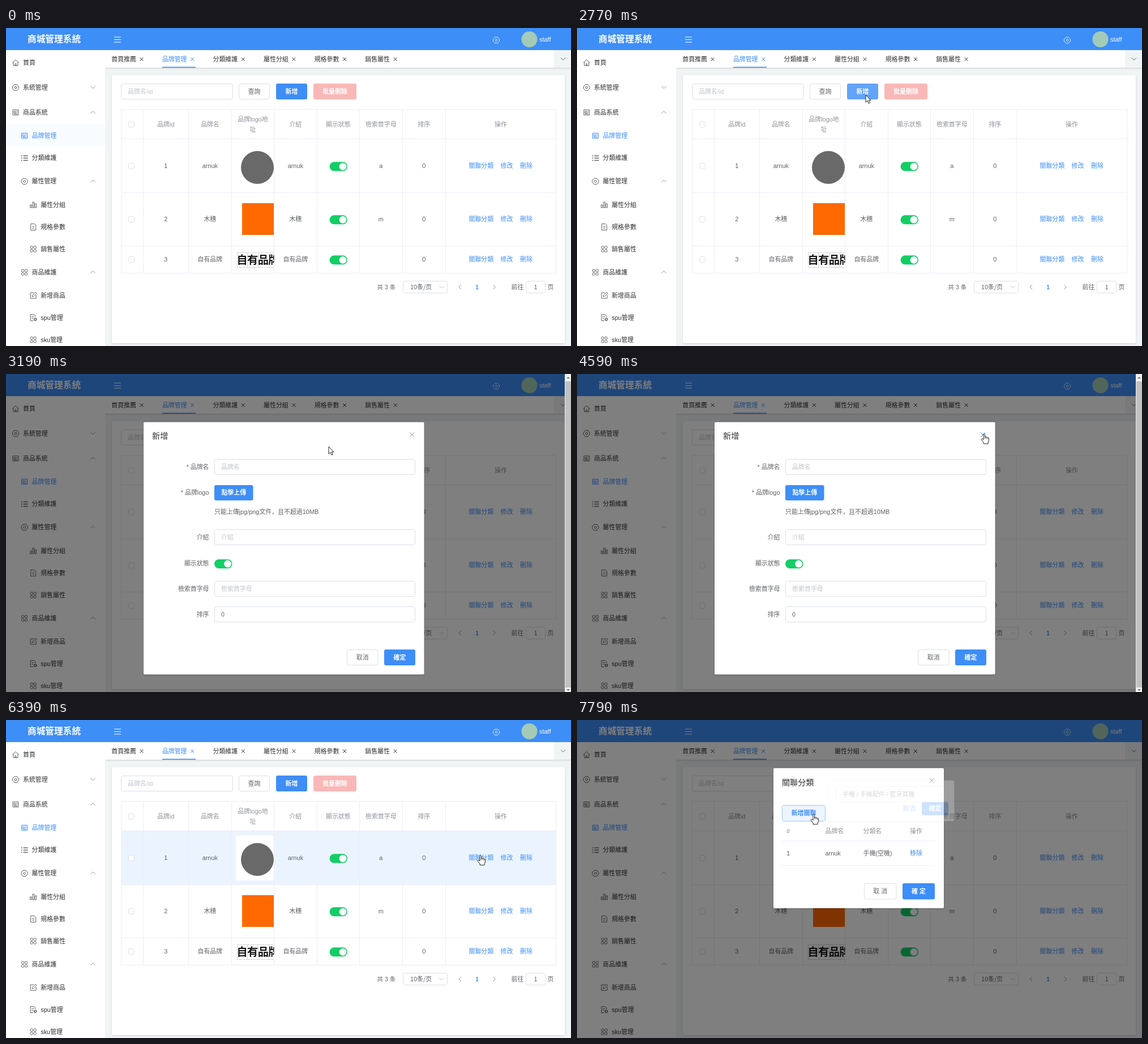
An HTML page for the animation above (8000 ms loop, 998x561 px).

```html
<!DOCTYPE html>
<html lang="zh-CN">
<head>
<meta charset="utf-8">
<title>商城管理系統</title>
<style>
html, body { margin: 0; width: 100%; height: 100%; overflow: hidden; background: #f1f4f5; }
svg { display: block; width: 998px; height: 561px; }
text { font: 10.92px "Liberation Sans", "Noto Sans CJK SC", "Noto Sans CJK TC", "Noto Sans CJK", sans-serif; white-space: pre; }
.medium { font-weight: 500; }
.bold { font-weight: 700; }
.value { font-family: "Noto Sans CJK SC", "Noto Sans CJK TC", "Noto Sans CJK", sans-serif; }
.anim { animation: 8s step-end infinite; }

#menuHover { animation-name: menuHover; }
@keyframes menuHover {
  0% { fill: #f9fcff; }
  22.125% { fill: #e9f3fe; }
  24.625%, 100% { fill: #fff; }
}
#addButton { animation-name: addButton; }
@keyframes addButton {
  0% { fill: #3e8ef7; }
  34.625% { fill: #62a4f9; }
  62.375%, 100% { fill: #3e8ef7; }
}
#rowHover { animation-name: rowHover; }
@keyframes rowHover {
  0% { opacity: 0; }
  67.375% { opacity: 1; }
  84.875%, 100% { opacity: 0; }
}
#shade { animation-name: shade; }
@keyframes shade {
  0% { opacity: 0; }
  37.125% { opacity: .34; }
  39.875% { opacity: .5; }
  59.875% { opacity: .02; }
  62.375% { opacity: 0; }
  82.375% { opacity: .34; }
  84.875%, 100% { opacity: .5; }
}
#scrollbar { animation-name: fadeBrand; }
@keyframes fadeBrand {
  0% { opacity: 0; }
  37.125% { opacity: .55; }
  39.875% { opacity: 1; }
  59.875% { opacity: .22; }
  62.375%, 100% { opacity: 0; }
}
#brandDialog { animation-name: fadeBrand, slideBrand; }
@keyframes slideBrand {
  0%, 37.125% { transform: translateY(-8px); }
  39.875% { transform: none; }
  59.875%, 100% { transform: translateY(-12px); }
}
#brandClose { animation-name: brandClose; }
@keyframes brandClose {
  0% { stroke: #909399; }
  44.875% { stroke: #3e8ef7; }
  59.875%, 100% { stroke: #909399; }
}
#linkDialog { animation-name: linkDialog; }
@keyframes linkDialog {
  0% { opacity: 0; transform: translateY(-8px); }
  82.375% { opacity: .55; transform: translateY(-8px); }
  84.875%, 100% { opacity: 1; transform: none; }
}
#linkHover { animation-name: linkHover; }
@keyframes linkHover { 0% { opacity: 0; } 94.875%, 100% { opacity: 1; } }
#popover { animation-name: popover; }
@keyframes popover { 0% { opacity: 0; } 97.375%, 100% { opacity: .25; } }

#pointer { animation-name: pointer; }
@keyframes pointer {
  0%, 2.5% { transform: translate(917px, 327px); }
  5% { transform: translate(690px, 292px); }
  7.5% { transform: translate(380px, 238px); }
  9.625% { transform: translate(150px, 202px); }
  12.125% { transform: translate(124px, 197px); }
  22.125% { transform: translate(310px, 172px); }
  24.625% { transform: translate(400px, 158px); }
  27.125% { transform: translate(465px, 140px); }
  29.625% { transform: translate(498px, 124px); }
  32.125% { transform: translate(509px, 119px); }
  34.625% { transform: translate(510px, 118px); }
  39.875% { transform: translate(570px, 128px); }
  42.375% { transform: translate(664px, 118px); }
  44.875% { transform: translate(708px, 107px); }
  47.375% { transform: translate(717px, 105px); }
  49.875% { transform: translate(718px, 105px); }
  62.375% { transform: translate(737px, 131px); }
  64.875% { transform: translate(785px, 195px); }
  67.375% { transform: translate(824px, 242px); }
  69.875% { transform: translate(830px, 249px); }
  72.375% { transform: translate(837px, 238px); }
  87.375% { transform: translate(720px, 212px); }
  89.875% { transform: translate(530px, 178px); }
  92.375%, 100% { transform: translate(417px, 166px); }
}
#arrow { animation-name: arrow; }
@keyframes arrow {
  0% { opacity: 0; }
  2.5% { opacity: 1; }
  12.125% { opacity: 0; }
  22.125% { opacity: 1; }
  44.875% { opacity: 0; }
  62.375% { opacity: 1; }
  72.375% { opacity: 0; }
  87.375% { opacity: 1; }
  92.375%, 100% { opacity: 0; }
}
#hand { animation-name: hand; }
@keyframes hand {
  0% { opacity: 0; }
  12.125% { opacity: 1; }
  22.125% { opacity: 0; }
  44.875% { opacity: 1; }
  62.375% { opacity: 0; }
  72.375% { opacity: 1; }
  87.375% { opacity: 0; }
  92.375%, 100% { opacity: 1; }
}
</style>
</head>
<body>
<svg id="stage" viewBox="0 0 998 561"></svg>
<script>
const BLUE = '#3e8ef7', INK = '#303133', TEXT = '#606266', MUTED = '#909399',
  HINT = '#c0c4cc', BORDER = '#dcdfe6', GRID = '#ebeef5', BACK = '#f1f4f5';

const rect = (x, y, w, h, fill, more = '') =>
  `<rect x="${x}" y="${y}" width="${w}" height="${h}" fill="${fill}" ${more}/>`;
const path = (d, color, more = '') => `<path d="${d}" fill="none" stroke="${color}" ${more}/>`;
const circle = (x, y, r, fill, more = '') => `<circle cx="${x}" cy="${y}" r="${r}" fill="${fill}" ${more}/>`;
// y is the vertical middle of the line
const text = (x, y, label, fill = TEXT, more = '', size = 10.92) =>
  `<text x="${x}" y="${y + size * .36}" fill="${fill}" style="font-size:${size}px" ${more}>${label}</text>`;
const MID = 'text-anchor="middle"', END = 'text-anchor="end"',
  MEDIUM = 'class="medium"', BOLD = 'class="bold"', VALUE = 'class="value"';
const group = (id, body) => `<g id="${id}" class="anim">${body}</g>`;

const box = (x, y, w, h, stroke = BORDER, more = '') =>
  rect(x + .5, y + .5, w - 1, h - 1, '#fff', `stroke="${stroke}" rx="3" ${more}`);
const button = (x, y, w, h, label, fill, id = '') =>
  (fill ? rect(x, y, w, h, fill, `rx="3" ${id && `id="${id}" class="anim"`}`) : box(x, y, w, h)) +
  text(x + w / 2, y + h / 2, label, fill ? '#fff' : TEXT, `${MID} ${fill ? BOLD : MEDIUM}`);
const toggle = (x, y) => rect(x, y - 8, 31.5, 16, '#13ce66', 'rx="8"') + circle(x + 23.5, y, 6.4, '#fff');
const cross = (x, y, r, color, more = '') =>
  path(`M${x - r} ${y - r}l${2 * r} ${2 * r}m0 ${-2 * r}l${-2 * r} ${2 * r}`, color, more);
const chevron = (x, y, dx, dy, color = MUTED) => dx
  ? path(`M${x - dx} ${y - 4}l${2 * dx} 4l${-2 * dx} 4`, color)
  : path(`M${x - 4} ${y - dy}l4 ${2 * dy}l4 ${-2 * dy}`, color);

const icons = {
  home: c => path('M-6 0L0-5.5L6 0M-4-1.5V5H4V-1.5M-1 5V1.5H1V5', c),
  gear: c => path('M-2.5-5.3H2.5L3.3-3.7L5.5-2V2L3.3 3.7L2.5 5.3H-2.5L-3.3 3.7L-5.5 2V-2L-3.3-3.7Z', c) +
    circle(0, 0, 1.9, 'none', `stroke="${c}"`),
  card: c => path('M-5-4.5H5V4.5H-5ZM-3-2H0V1H-3ZM1.5-2H3.5M1.5 0H3.5M-3 2.5H3.5', c),
  list: c => path('M-6-4H-4M-2-4H6M-6 0H-4M-2 0H6M-6 4H-4M-2 4H6', c, 'stroke-width="1.5"'),
  bars: c => path('M-5.5 0H-3V5H-5.5ZM-1.3-5H1.3V5H-1.3ZM3-2H5.5V5H3Z', c),
  doc: c => path('M-4.5-5.5H2L4.5-3V5.5H-4.5ZM-2-1H2M-2 2H2', c),
  grid: c => [[-3, -3], [3, -3], [-3, 3], [3, 3]]
    .map(([x, y]) => rect(x - 2.1, y - 2.1, 4.2, 4.2, 'none', `stroke="${c}" rx="1.3"`)).join(''),
  edit: c => path('M1-5H-5V5H5V-1M-2 2L-1.5-.5L4-6L6-4L.5 1.5Z', c),
  docGear: c => path('M4-1V-3L1.5-5.5H-5V5.5H0M-3-2H1.5M-3 1H0', c) + circle(3.5, 3, 2, 'none', `stroke="${c}" stroke-width="1.6"`)
};
const icon = (name, x, y, color = TEXT) => `<g transform="translate(${x} ${y})">${icons[name](color)}</g>`;

function header() {
  return rect(0, 0, 998, 39, BLUE) +
    text(38, 19.5, '商城管理系統', '#fff', BOLD, 15.7) +
    path('M191 16H203M191 20.5H203M191 25H203', '#fff', 'stroke-width="1.2"') +
    icon('gear', 866, 21.5, '#d5e6fd') + circle(924.5, 20, 14, '#a4cbb8') + text(942, 20, 'staff', '#fff');
}

function sidebar() {
  const items = [
    ['首頁', 61.5, 0, 'home'], ['系統管理', 105, 0, 'gear', 2], ['商品系統', 149, 0, 'card', -2],
    ['品牌管理', 190, 1, 'card'], ['分類維護', 229.5, 1, 'list'], ['屬性管理', 270.5, 1, 'gear', -2],
    ['屬性分組', 312, 2, 'bars'], ['規格參數', 351, 2, 'doc'], ['銷售屬性', 390, 2, 'grid'],
    ['商品維護', 431, 1, 'grid', -2], ['新增商品', 472, 2, 'edit'], ['spu管理', 511, 2, 'docGear'],
    ['sku管理', 550, 2, 'grid']
  ];
  return rect(0, 39, 175, 522, '#fff') + rect(0, 170, 175, 39, '#fff', 'id="menuHover" class="anim"') +
    items.map(([label, y, level, name, fold]) => {
      const active = label === '品牌管理';
      return icon(name, 17 + level * 15.6, y, active ? BLUE : TEXT) +
        text(30 + level * 15.6, y, label, active ? BLUE : INK) + (fold ? chevron(153.5, y - .5, 0, fold) : '');
    }).join('');
}

function tabs() {
  return rect(175, 39, 823, 31, '#fff', 'filter="url(#soft)"') + rect(968, 39, 30, 31, BACK) +
    chevron(984, 54.5, 0, 2, TEXT) +
    ['首頁推薦', '品牌管理', '分類維護', '屬性分組', '規格參數', '銷售屬性'].map((label, i) => {
      const x = 186.3 + i * 89.6, color = i === 1 ? BLUE : INK;
      return text(x, 55, label, color) + cross(x + 53.3, 55, 3, color);
    }).join('') + rect(276, 68.5, 59, 1.6, BLUE);
}

function table() {
  const xs = [203, 242, 322, 398, 473, 549, 624, 700, 776, 971], ys = [143, 195, 290, 384, 432];
  const mid = i => (xs[i] + xs[i + 1]) / 2 + .3;
  const check = y => box(216, y - 5.5, 11, 11, BORDER, 'rx="1.5"');
  const heads = ['品牌id', '品牌名', '', '介紹', '顯示狀態', '檢索首字母', '排序', '操作'];
  const rows = [[243.5, 1, 'arnuk', 'a'], [337.5, 2, '木穗', 'm'], [408.5, 3, '自有品牌', '']];
  const grid = xs.map(x => `M${x + .5} 143V433`).join('') + ys.map(y => `M203 ${y + .5}H971`).join('');
  return rect(203, 196, 768, 94, '#ebf4fe', 'id="rowHover" class="anim"') + path(grid, GRID) + check(170) +
    heads.map((h, i) => text(mid(i + 1), 170, h, MUTED, `${MID} ${MEDIUM}`)).join('') +
    text(436, 161, '品牌logo地', MUTED, `${MID} ${MEDIUM}`) + text(436, 179, '址', MUTED, `${MID} ${MEDIUM}`) +
    rect(406, 204, 67, 79, '#fff') + circle(444, 246, 29, '#696969') + rect(417, 309, 56, 56, '#ff6900') +
    path('M408 396.5H473M408 422.5H473M408.5 396V422M426.5 396V422M445.5 396V422M464.5 396V422', '#d5d5d5') +
    `<g clip-path="url(#logoCell)">${[...'自有品牌'].map((c, i) =>
      text(417 + i * 18.7, 409, c, '#151515', `${MID} ${BOLD}`, 19)).join('')}</g>` +
    rows.map(([y, id, name, letter]) => check(y) +
      [id, name, '', name, '', letter, 0].map((v, i) => text(mid(i + 1), y, v, TEXT, MID)).join('') +
      toggle(571.5, y + .8) +
      text(817.5, y, '關聯分類', BLUE) + text(873.5, y, '修改', BLUE) + text(908, y, '刪除', BLUE)).join('');
}

function page() {
  return rect(187, 83, 800, 473, '#fff', 'rx="3" filter="url(#soft)"') +
    box(203, 98, 198, 28) + text(215, 112, '品牌名/id', HINT) +
    button(411, 98, 55, 28, '查詢') + button(477, 98, 55, 28, '新增', BLUE, 'addButton') +
    button(543, 98, 76, 28, '批量刪除', '#f9b8b8') + table() +
    text(655.5, 457.5, '共 3 条', TEXT, '', 10.5) + box(701, 446, 79, 22) +
    text(714, 457.5, '10条/页', TEXT, VALUE) + chevron(769.5, 457, 0, 1.6, HINT) +
    chevron(802, 457, -1.8, 0) + text(832, 457.5, '1', BLUE, `${MID} ${BOLD}`, 10.2) + chevron(862.5, 457, 1.8, 0) +
    text(892.5, 457.5, '前往') + box(918, 446, 35, 22) + text(935.5, 457.5, '1', TEXT, `${MID} ${VALUE}`) +
    text(956.5, 457.5, '页');
}

function brandDialog() {
  const label = (y, name) => text(358.5, y, name, TEXT, END);
  const field = (y, name, hint, color = HINT) =>
    label(y, name) + box(368, y - 14, 355, 28) + text(380, y, hint, color, VALUE);
  return rect(243, 85, 495.5, 445, '#fff', 'rx="2" filter="url(#soft)"') + text(258, 109, '新增', INK, '', 14.2) +
    cross(717, 107, 4, MUTED, 'id="brandClose" class="anim"') +
    field(164, '* 品牌名', '品牌名') + label(209.5, '* 品牌logo') + button(368, 196, 68.5, 27, '點擊上傳', BLUE) +
    text(368, 243.5, '只能上傳jpg/png文件，且不超過10MB') + field(288, '介紹', '介紹') +
    label(334, '顯示狀態') + toggle(368, 335) + field(379, '檢索首字母', '檢索首字母') + field(424, '排序', '0', TEXT) +
    button(602, 486, 55.5, 28, '取消') + button(668, 486, 55, 28, '確定', BLUE);
}

function linkDialog() {
  const columns = [370, 438.5, 505.5, 588];
  const line = (y, cells, color, more) => cells.map((c, i) => text(columns[i], y, c, i === 3 && y > 200 ? BLUE : color, more)).join('');
  const popover = rect(443, 107, 223, 71, '#fff', `rx="3" stroke="${GRID}" filter="url(#soft)"`) +
    box(457, 117, 199, 28) + text(469, 131, '手機 / 手機配件 / 藍牙耳機') + chevron(641, 131, 0, 2, HINT) +
    text(576, 156.5, '取消', BLUE) + button(609, 145, 47, 23, '確定', BLUE);
  return rect(347, 85, 301, 247, '#fff', 'rx="2" filter="url(#soft)"') + text(362, 109.5, '關聯分類', INK, '', 14.1) +
    cross(626.5, 107, 4, MUTED) + button(362, 150, 77, 29, '新增關聯') +
    group('linkHover', box(362, 150, 77, 29, '#9fc6fb') + rect(363, 151, 75, 27, '#ecf4fe', 'rx="2"') +
      text(400.5, 164.5, '新增關聯', BLUE, `${MID} ${BOLD}`)) +
    line(196.5, ['#', '品牌名', '分類名', '操作'], MUTED, MEDIUM) + line(235.5, ['1', 'arnuk', '手機(空機)', '移除'], TEXT, '') +
    path('M362 213.5H632M362 256.5H632', GRID) +
    button(507, 288, 57.5, 28.5, '取 消') + button(575, 288, 57, 28.5, '確 定', BLUE) + group('popover', popover);
}

const scrollbar = rect(987, 0, 11, 561, '#f1f1f1') + rect(988, 13, 10, 540, '#c1c1c1') +
  '<path d="M990 8l3-3 3 3zM990 556l3 3 3-3z" fill="#707070"/>';

const outline = (d, more = '') => `<path d="${d}" fill="#fff" stroke="#222" stroke-linejoin="round" ${more}/>`;
const pointer = group('arrow', outline('M0 0V13L3 10.3L5.2 15L7.3 14L5.2 9.5H9Z')) +
  group('hand', outline('M0 1.2Q1.3-.8 2.6 1.2V6Q4.2 5 5 6.5Q6.6 5.6 7.4 7.2Q9.4 6.6 9.5 8.8V12L8 16V18H.2V16L-4 10.6Q-3.4 8.6-1.6 9.6L0 11Z') +
    path('M2.6 6V9M5 6.5V9.4M7.4 7.2V9.8', '#222', 'stroke-width=".8"'));

document.getElementById('stage').innerHTML = `<defs>
  <filter id="soft" x="-10%" y="-20%" width="120%" height="140%"><feDropShadow dx="0" dy="1" stdDeviation="1.8" flood-opacity=".16"/></filter>
  <clipPath id="logoCell"><rect x="406" y="390" width="67.5" height="40"/></clipPath></defs>` +
  rect(0, 0, 998, 561, BACK) + page() + tabs() + sidebar() + header() +
  rect(0, 0, 998, 561, '#000', 'id="shade" class="anim"') +
  group('scrollbar', scrollbar) + group('brandDialog', brandDialog()) + group('linkDialog', linkDialog()) +
  group('pointer', pointer);
</script>
</body>
</html>
```
